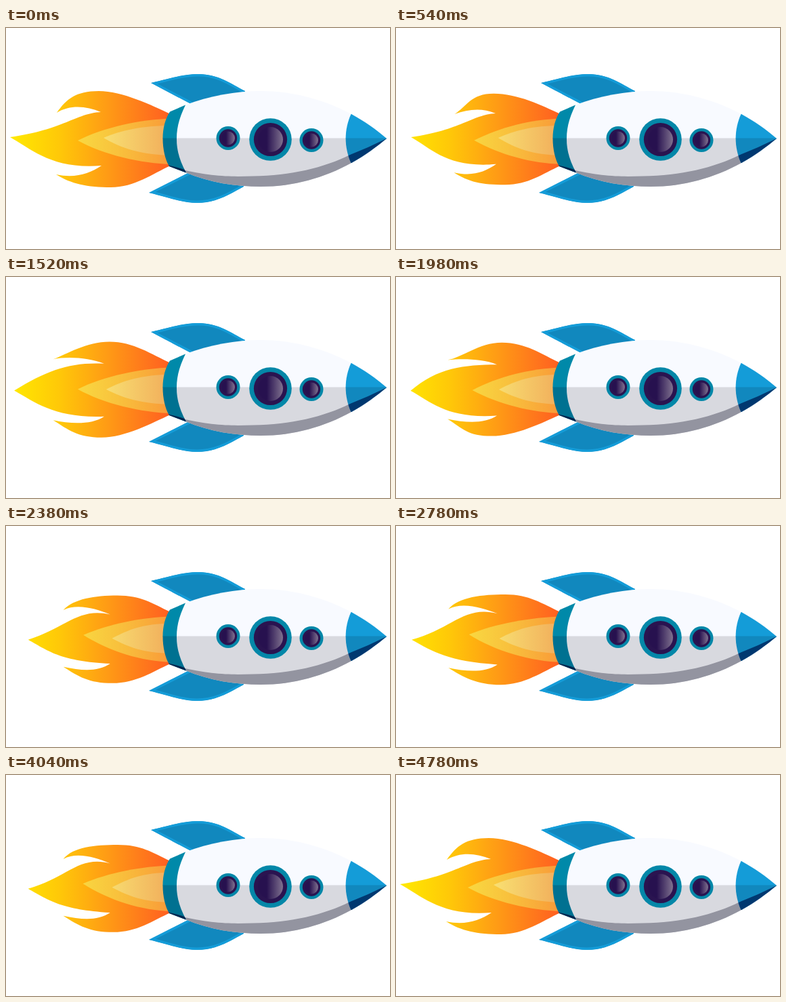
An HTML page for the animation above (4800 ms loop, 567x326 px).

```html
<!DOCTYPE html>
<html lang="en">
<head>
<meta charset="utf-8">
<title>Rocket</title>
<style>
  html, body { margin: 0; width: 100%; height: 100%; overflow: hidden; background: #fff; }
  svg { display: block; width: 100%; height: 100%; }
</style>
</head>
<body>
<svg viewBox="0 0 567 326">
  <defs>
    <linearGradient id="fire" gradientUnits="userSpaceOnUse" x1="6" x2="243">
      <stop offset="0" stop-color="#ffea00"/>
      <stop offset=".3" stop-color="#ffc908"/>
      <stop offset=".58" stop-color="#ff9f14"/>
      <stop offset="1" stop-color="#ff5e21"/>
    </linearGradient>
    <linearGradient id="glow" gradientUnits="userSpaceOnUse" x1="106" x2="243">
      <stop offset="0" stop-color="#f6e455" stop-opacity=".72"/>
      <stop offset="1" stop-color="#f2dc55" stop-opacity=".46"/>
    </linearGradient>
    <linearGradient id="core" gradientUnits="userSpaceOnUse" x1="144" x2="243">
      <stop offset="0" stop-color="#f8e886"/>
      <stop offset="1" stop-color="#eeb468"/>
    </linearGradient>
    <linearGradient id="glass">
      <stop offset=".35" stop-color="#27114f"/>
      <stop offset="1" stop-color="#80728f"/>
    </linearGradient>
    <path id="hull" d="M264,114C300,100 340,93 376,93C425,93 470,106 510,127C530,138 547,150 562,163C547,175 530,188 510,199C470,221 425,234 376,234C340,234 300,228 265,213C255,195 252,180 252,163C252,145 256,130 264,114Z"/>
    <path id="nose" d="M509.500,127C499,150 499,176 509.500,199L570,199V127Z"/>
    <path id="collar" d="M265,113.500L242,123.500C235,134 231.500,148 231.500,163C231.500,179 235,194 241,204L266,213.500C256,195 252,180 252,163C252,145 257,130 265,113.500Z"/>
    <path id="shade" d="M240,204C300,220 330,219.500 365,218.500C420,218 470,206 508,187Q536,176 562,163V240H240Z"/>
    <path id="finTop" d="M214,81C243,74 262,68 282,68C312,67 332,82 353,93L340,130L307,130Z"/>
    <path id="finLow" d="M211,243C240,250 260,258 282,258C312,258 332,244 351,234L340,195L306,195Z"/>
    <clipPath id="inHull"><use href="#hull"/></clipPath>
    <clipPath id="inNose"><use href="#nose"/></clipPath>
    <clipPath id="inCollar"><use href="#collar"/></clipPath>
    <clipPath id="inTop"><use href="#finTop"/></clipPath>
    <clipPath id="inLow"><use href="#finLow"/></clipPath>
    <g id="port">
      <circle r="17.5" fill="#0487a8"/>
      <circle r="13.2" fill="#2a1450"/>
      <circle r="10" fill="url(#glass)"/>
    </g>
  </defs>

  <path id="outer" fill="url(#fire)"/>
  <path id="middle" fill="url(#glow)"/>
  <path id="inner" fill="url(#core)" fill-opacity=".72"/>

  <g fill="#1188be" stroke="#149cd8" stroke-width="7">
    <use href="#finTop" clip-path="url(#inTop)"/>
    <use href="#finLow" clip-path="url(#inLow)"/>
  </g>

  <g clip-path="url(#inHull)">
    <rect x="230" y="90" width="335" height="73" fill="#f8faff"/>
    <rect x="230" y="162.500" width="335" height="75" fill="#d8d9df"/>
    <use href="#shade" fill="#9394a0"/>
    <g clip-path="url(#inNose)">
      <rect x="495" y="120" width="70" height="43" fill="#149cd8"/>
      <rect x="495" y="162.500" width="70" height="40" fill="#1188be"/>
      <use href="#shade" fill="#003870"/>
    </g>
  </g>

  <g clip-path="url(#inCollar)">
    <rect x="230" y="110" width="40" height="53" fill="#0089a9"/>
    <rect x="230" y="162.500" width="40" height="53" fill="#007191"/>
    <path d="M238,202L254,206L270,211V220H238Z" fill="#00264f"/>
  </g>

  <use href="#port" x="328" y="162.5"/>
  <use href="#port" x="451" y="165.5"/>
  <g transform="translate(390.5 164.5)">
    <circle r="31.3" fill="#0487a8"/>
    <circle r="24.6" fill="#2a1450"/>
    <circle r="18.5" fill="url(#glass)"/>
  </g>
</svg>
<script>
  const LOOP = 4800, PULSE = LOOP / 3, LAG = 210;
  const NOZZLE = [243, 163];

  // Flame outline at full length: streaming straight back, and curled.
  const straight = {
    tip: [6, 161], shoulder: [85, 150], bow: [103, 126],
    notch: [140, 124], horn: [75, 125], lobe: [137, 93],
    notch2: [141, 203], horn2: [74, 216], lobe2: [155, 235],
    mid: [106, 166], core: [144, 162]
  };
  const curled = {
    tip: [12, 168], shoulder: [50, 130], bow: [95, 130],
    notch: [145, 128], horn: [69, 121], lobe: [152, 94],
    notch2: [145, 206], horn2: [69, 211], lobe2: [135, 237],
    mid: [108, 168], core: [148, 166]
  };
  // How far a trailing bulge shifts the curled outline.
  const bulge = { shoulder: [28, 24], bow: [-2, -17], lobe: [6, 5], lobe2: [17, 0], mid: [-8, -9] };

  const mix = (a, b, k) => a + (b - a) * k;
  const wave = t => (1 - Math.cos(2 * Math.PI * t / PULSE)) / 2;
  function ramp(t, from, to) {
    const u = Math.min(1, Math.max(0, (t - from) / (to - from)));
    return u * u * (3 - 2 * u);
  }

  function flameAt(t) {
    const squeeze = wave(t), swell = wave(t - LAG);
    const curl = ramp(t, 1080, 1600) - ramp(t, 4040, LOOP);
    const scale = [1 - 0.09 * squeeze, 1 - 0.07 * squeeze];
    const flame = {
      swell: swell * curl,
      bend: mix(12 * squeeze - 20, -1 - 19 * swell, curl)
    };
    for (const name in straight) {
      const push = bulge[name] || [0, 0];
      flame[name] = straight[name].map((v, i) => {
        const p = mix(v, curled[name][i] + push[i] * swell, curl);
        return mix(NOZZLE[i], p, scale[i]);
      });
    }
    return flame;
  }

  const off = ([x, y], dx, dy) => [x + dx, y + dy];
  const curve = (...pts) => "C" + pts.map(p => p[0].toFixed(2) + "," + p[1].toFixed(2)).join(" ");

  function outline({ tip, shoulder, bow, notch, horn, lobe, notch2, horn2, lobe2, bend, swell }) {
    return "M243,127" +
      curve([215, 114], off(lobe, 35, 0), lobe) +
      curve(off(lobe, -34, 0), off(horn, 22 + bend * 0.4, bend), horn) +
      curve(off(horn, 20, bend * 0.6), off(notch, -22, -9), notch) +
      curve(bow, shoulder, tip) +
      curve(off(tip, 32, 18), off(notch2, -72, 6 - 12 * swell), notch2) +
      curve(off(notch2, -18, 12), off(horn2, 28, 6), horn2) +
      curve(off(horn2, 22, 14), off(lobe2, -35, 0), lobe2) +
      curve(off(lobe2, 35, 0), [216, 215], [243, 203]) + "Z";
  }

  function tongue(tip, top, bottom, reach) {
    return `M245,${top}` +
      curve([200, top + 1], off(tip, reach, (top - tip[1]) * 0.6), tip) +
      curve(off(tip, reach, (bottom - tip[1]) * 0.6), [200, bottom - 1], [245, bottom]) + "Z";
  }

  const [outer, middle, inner] = ["outer", "middle", "inner"].map(id => document.getElementById(id));

  function draw(now) {
    const flame = flameAt(now % LOOP);
    outer.setAttribute("d", outline(flame));
    middle.setAttribute("d", tongue(flame.mid, 133.5, 201, 38));
    inner.setAttribute("d", tongue(flame.core, 143.5, 188, 26));
  }

  let start;
  function tick(now) {
    start ??= now;
    draw(Math.max(0, now - start));
    requestAnimationFrame(tick);
  }
  draw(0);
  requestAnimationFrame(tick);
</script>
</body>
</html>
```
